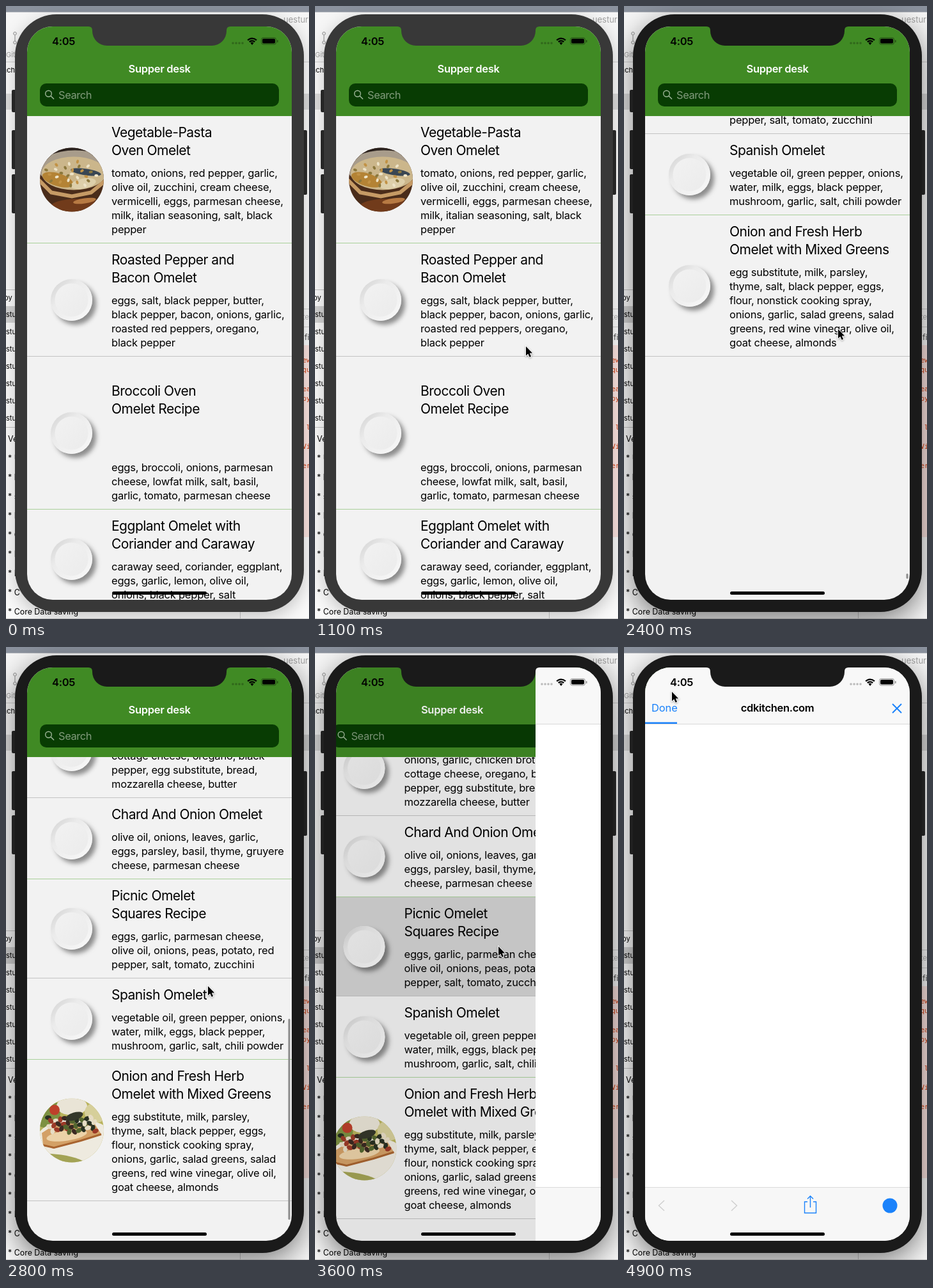
An HTML page with a canvas that plays this animation: 474 by 958 pixels, repeating every 5 s.

```html
<!DOCTYPE html>
<html lang="en">
<head>
<meta charset="utf-8">
<title>Recipe list</title>
<style>
html, body { margin: 0; width: 100%; height: 100%; overflow: hidden; background: #f4f4f4; }
canvas { display: block; width: 474px; height: 958px; }
</style>
</head>
<body>
<canvas id="stage" width="474" height="958"></canvas>
<script>
const ctx = document.getElementById('stage').getContext('2d');
const LOOP = 5000, STEP = 100;
const SANS = 'Inter, "Open Sans", sans-serif';
const MONO = '"DejaVu Sans Mono", monospace';
const BLUE = '#1a82fb';
const LEFT = 33, TOP = 32, WIDE = 414, LIST_TOP = 172, REST = 827;

const row = (title, items, photo, gap = 0) => ({
  title: title.split('|'), items: items.split('|'), photo, gap
});
const rows = [
  row('Vegetable-Pasta|Oven Omelet', 'tomato, onions, red pepper, garlic,|olive oil, zucchini, cream cheese,|vermicelli, eggs, parmesan cheese,|milk, italian seasoning, salt, black|pepper', 'skillet'),
  row('Roasted Pepper and|Bacon Omelet', 'eggs, salt, black pepper, butter,|black pepper, bacon, onions, garlic,|roasted red peppers, oregano,|black pepper'),
  row('Broccoli Oven|Omelet Recipe', 'eggs, broccoli, onions, parmesan|cheese, lowfat milk, salt, basil,|garlic, tomato, parmesan cheese', null, 28),
  row('Eggplant Omelet with|Coriander and Caraway', 'caraway seed, coriander, eggplant,|eggs, garlic, lemon, olive oil,|onions, black pepper, salt'),
  row('Italian Omelet', 'onions, garlic, chicken broth,|cottage cheese, oregano, black|pepper, egg substitute, bread,|mozzarella cheese, butter'),
  row('Chard And Onion Omelet', 'olive oil, onions, leaves, garlic,|eggs, parsley, basil, thyme, gruyere|cheese, parmesan cheese'),
  row('Picnic Omelet|Squares Recipe', 'eggs, garlic, parmesan cheese,|olive oil, onions, peas, potato, red|pepper, salt, tomato, zucchini'),
  row('Spanish Omelet', 'vegetable oil, green pepper, onions,|water, milk, eggs, black pepper,|mushroom, garlic, salt, chili powder'),
  row('Onion and Fresh Herb|Omelet with Mixed Greens', 'egg substitute, milk, parsley,|thyme, salt, black pepper, eggs,|flour, nonstick cooking spray,|onions, garlic, salad greens, salad|greens, red wine vinegar, olive oil,|goat cheese, almonds', 'pizza')
];
let total = 0;
for (const r of rows) {
  r.top = total;
  r.height = 33 + 28 * r.title.length + 22 * r.items.length + 3 * r.gap;
  total += r.height;
}

// Keys: time, then values, joined by straight segments.
const pointerKeys = [
  [800, 470, 470], [1100, 330, 532], [1200, 334, 567], [1300, 337, 660], [1400, 339, 714],
  [1600, 339, 714], [1700, 338, 690], [1800, 337, 600], [1900, 336, 520], [2400, 335, 505],
  [2800, 316, 530], [3200, 287, 468], [3900, 287, 468], [4500, 408, 102], [4700, 71, 102],
  [4800, 71, 102], [4900, 75, 70]
];
const scrollKeys = [
  [1600, 0], [1700, 24], [1800, 114], [1900, 200], [2100, 400], [2200, 600], [2300, 950], [2400, 1173]
];

function along(keys, t) {
  if (t <= keys[0][0]) return keys[0].slice(1);
  for (let i = 1; i < keys.length; i++) {
    const a = keys[i - 1], b = keys[i];
    if (t <= b[0]) {
      const u = (t - a[0]) / (b[0] - a[0]);
      return a.slice(1).map((v, j) => v + (b[j + 1] - v) * u);
    }
  }
  return keys[keys.length - 1].slice(1);
}

// Remaining share of a critically damped spring.
const settle = (t, k) => (1 + k * t) * Math.exp(-k * t);

function scrollAt(t) {
  const s = t <= 2400 ? along(scrollKeys, t)[0] : REST + 346 * settle((t - 2400) / 1000, 10.4);
  return Math.round(s);
}

function box(x, y, w, h, color) {
  ctx.fillStyle = color;
  ctx.fillRect(x, y, w, h);
}

function round(x, y, w, h, r, color) {
  ctx.beginPath();
  ctx.roundRect(x, y, w, h, r);
  ctx.fillStyle = color;
  ctx.fill();
}

function oval(x, y, rx, ry, color, turn = 0) {
  ctx.beginPath();
  ctx.ellipse(x, y, rx, ry, turn, 0, 7);
  ctx.fillStyle = color;
  ctx.fill();
}

function line(points, color, width) {
  ctx.beginPath();
  points.forEach(([x, y]) => ctx.lineTo(x, y));
  ctx.strokeStyle = color;
  ctx.lineWidth = width;
  ctx.stroke();
}

function text(str, x, y, size, color = '#000', track = 0, weight = 400, family = SANS, align = 'left') {
  ctx.font = `${weight} ${size}px ${family}`;
  ctx.letterSpacing = track + 'px';
  ctx.textAlign = align;
  ctx.fillStyle = color;
  ctx.fillText(str, x, y);
}

function shadow(color, blur, dx, dy) {
  ctx.shadowColor = color;
  ctx.shadowBlur = blur;
  ctx.shadowOffsetX = dx;
  ctx.shadowOffsetY = dy;
}

function desktop() {
  box(0, 0, 474, 958, '#fafafa');
  box(0, 0, 474, 10, '#8b929e');
  box(0, 9, 474, 1, '#b5b8be');
  box(0, 10, 474, 78, '#f6f6f6');
  box(0, 87, 474, 1, '#d0d0d0');
  box(0, 137, 474, 25, '#dcdcdc');
  ctx.strokeStyle = '#8c8c8c';
  ctx.lineWidth = 1;
  for (const y of [43, 57]) {
    ctx.beginPath();
    ctx.arc(14, y, 2.3, 0, 7);
    ctx.stroke();
  }
  line([[14, 46], [14, 54]], '#8c8c8c', 1);
  text('Git', 0, 80, 11, '#a0a0a0');
  text('ach', -5, 104, 11);
  text('uestur', 434, 26, 13, '#a0a0a0');

  box(0, 443, 20, 1, '#c4c4c4');
  text('by', -3, 460, 11);
  box(0, 469, 20, 26, '#d2d2d2');
  for (let i = 0; i < 7; i++) text('stu', 0, 486 + 27 * i, 11);
  box(0, 658, 20, 1, '#c4c4c4');
  text('Ve', 3, 681, 12.4);
  'UlsICIIC'.split('').forEach((c, i) => text('* ' + c, 3, 711 + 30 * i, 12.4));
  text('* Core Data saving', 3, 951, 12.4);
  box(0, 957, 474, 1, '#c9c9c9');
  box(366, 940, 1, 18, '#c9c9c9');

  box(460, 473, 14, 1, '#cfcfcf');
  text('te', 464, 490, 11, '#b0b0b0');
  box(460, 501, 14, 1, '#cfcfcf');
  text('fi', 467, 522, 12, '#444');
  box(460, 530, 14, 300, '#fbe3df');
  [['ew', 557], ['qu', 572], ['ea', 602], ['py', 617], [' l', 662], ['Vi', 692], ['er', 722]]
    .forEach(([s, y]) => text(s, 464, y, 10, '#cf3d10', 0, 400, MONO));
}

function shell(focused) {
  const color = focused ? '#1a1a1a' : '#383838';
  for (const [x, y, h] of [[9, 131, 35], [9, 194, 61], [9, 263, 61], [461, 194, 101]])
    round(x, y, 10, h, 2, '#2a2a2a');
  ctx.save();
  if (focused) shadow('rgba(0,0,0,.5)', 45, 0, 14);
  else shadow('rgba(0,0,0,.22)', 28, 0, 8);
  round(14, 13, 452, 934, 65, color);
  ctx.restore();
  return color;
}

function notch(color) {
  ctx.beginPath();
  ctx.moveTo(129, 31);
  ctx.lineTo(129, 32);
  ctx.quadraticCurveTo(135, 32, 135, 38);
  ctx.arcTo(135, 62, 159, 62, 23);
  ctx.arcTo(345, 62, 345, 38, 23);
  ctx.lineTo(345, 38);
  ctx.quadraticCurveTo(345, 32, 351, 32);
  ctx.lineTo(351, 31);
  ctx.fillStyle = color;
  ctx.fill();
}

function statusBar() {
  text('4:05', 72, 61, 16.5, '#000', -0.3, 600);
  for (let i = 0; i < 4; i++) oval(355 + 5 * i, 58, 1.8, 1.8, 'rgba(0,0,0,.25)');
  ctx.strokeStyle = '#000';
  ctx.lineWidth = 2.3;
  for (const r of [5.7, 9.4]) {
    ctx.beginPath();
    ctx.arc(385, 60, r, -Math.PI * 0.76, -Math.PI * 0.24);
    ctx.stroke();
  }
  ctx.beginPath();
  ctx.moveTo(385, 61);
  ctx.arc(385, 60, 3.4, -Math.PI * 0.76, -Math.PI * 0.24);
  ctx.fillStyle = '#000';
  ctx.fill();
  ctx.beginPath();
  ctx.roundRect(399.5, 49.5, 23, 10.5, 3);
  ctx.strokeStyle = 'rgba(0,0,0,.4)';
  ctx.lineWidth = 1;
  ctx.stroke();
  round(401, 51, 20, 7.5, 1.8, '#000');
  round(424, 53, 1.5, 4, 1, 'rgba(0,0,0,.45)');
}

function plate(x, y) {
  ctx.save();
  shadow('rgba(0,0,0,.42)', 7, 6, 6);
  oval(x, y, 32.5, 32.5, '#ececec');
  ctx.restore();
  const rim = ctx.createLinearGradient(x - 24, y - 24, x + 24, y + 24);
  rim.addColorStop(0, '#dadada');
  rim.addColorStop(0.3, '#ebebeb');
  rim.addColorStop(1, '#f6f6f6');
  oval(x, y, 32.5, 32.5, rim);
  const bowl = ctx.createLinearGradient(x - 20, y - 20, x + 20, y + 20);
  bowl.addColorStop(0, '#f1f1f1');
  bowl.addColorStop(1, '#ececec');
  oval(x, y, 26, 26, bowl);
}

const photos = {
  skillet() {
    box(-50, -50, 100, 100, '#4a2c1a');
    oval(-12, -44, 50, 16, '#2a211d');
    oval(5, -18, 58, 28, '#a89c8b');
    oval(3, -10, 50, 26, '#cbb68b');
    oval(22, -12, 24, 5, '#394653', 0.15);
    oval(-22, 0, 25, 10, '#b48335', 0.3);
    oval(18, 6, 20, 8, '#ddcfaa', -0.2);
    for (let i = 0; i < 26; i++) {
      const a = i * 2.4, r = Math.sqrt(i / 26);
      oval(Math.cos(a) * r * 43, -9 + Math.sin(a) * r * 21, 3, 2, ['#eee4c8', '#8c783d', '#c29245'][i % 3], a);
    }
    line([[-52, 0], [-32, 20], [0, 26], [30, 20], [52, 2]], '#c59a65', 6);
    oval(8, 43, 42, 13, '#713b1b');
    oval(20, 33, 18, 4, '#b77a43', -0.15);
  },
  pizza() {
    box(-50, -50, 100, 100, '#b9b35c');
    oval(-40, -28, 22, 24, '#7d9142');
    oval(0, -38, 24, 14, '#e9e4d6');
    oval(38, -28, 18, 16, '#d6cf9a');
    oval(6, 16, 62, 34, '#eeeadf');
    oval(-18, 46, 40, 8, '#a3a355', 0.15);
    ctx.beginPath();
    [[-47, 4], [-22, -12], [36, -10], [46, 6], [14, 16], [-30, 28], [-45, 22]].forEach(p => ctx.lineTo(...p));
    ctx.fillStyle = '#d3a066';
    ctx.fill();
    oval(-8, 8, 32, 8, '#ecd2a8', -0.15);
    line([[-45, 23], [-28, 27], [14, 16], [46, 6]], '#a8642f', 3);
    for (let i = 0; i < 34; i++) {
      const x = (i * 29) % 75 - 37, y = -20 + (i * 17) % 23;
      oval(x, y, 5, 3.5, ['#293022', '#9c3a28', '#55672f', '#e6dcc4', '#3b2a22'][i % 5], i);
    }
    oval(-27, -32, 8, 8, '#bd402b');
    oval(4, -22, 14, 6, '#34372a', -0.3);
  }
};

function photo(name, x, y) {
  ctx.save();
  ctx.translate(x, y);
  ctx.beginPath();
  ctx.arc(0, 0, 50, 0, 7);
  ctx.clip();
  photos[name]();
  ctx.restore();
}

function listRow(r, i, t, y) {
  if (i === 6 && t >= 3400) box(LEFT, y, WIDE, r.height, '#d3d3d3');
  const mid = y + r.height / 2;
  if (r.photo === 'skillet' || (r.photo && t >= 2600)) photo(r.photo, 103, mid);
  else plate(102.5, mid);
  r.title.forEach((s, n) => text(s, 165, y + 33 + r.gap + 28 * n, 21, '#000', -0.5));
  const first = y + 39 + 28 * r.title.length + 3 * r.gap;
  r.items.forEach((s, n) => text(s, 165, first + 22 * n, 16.5, '#000', -0.21));
  const green = (i < 4) === (i % 2 === 0);
  box(LEFT, y + r.height - 1, WIDE, 1, green ? '#a9d09a' : '#c3c3c3');
}

function scrollBar(s) {
  const length = Math.max(8, 342 - Math.max(0, s - REST));
  const top = s < REST ? 175 + s / REST * 378 : 895 - length;
  round(441.5, top, 3, length, 1.5, '#8d8d8d');
}

function listView(t) {
  const s = scrollAt(t);
  box(LEFT, TOP, WIDE, 896, '#f2f2f2');
  rows.forEach((r, i) => {
    const y = LIST_TOP + r.top - s;
    if (y < 940 && y + r.height > LIST_TOP) listRow(r, i, t, y);
  });
  if (t >= 1600) scrollBar(s);
  box(LEFT, TOP, WIDE, LIST_TOP - TOP, '#408a24');
  text('Supper desk', 240, 104, 16.5, '#fff', -0.3, 600, SANS, 'center');
  round(53, 121, 374, 36, 10, '#083c03');
  ctx.beginPath();
  ctx.arc(66.5, 137, 4.8, 0, 7);
  ctx.strokeStyle = '#9db598';
  ctx.lineWidth = 1.4;
  ctx.stroke();
  line([[70, 140.5], [75, 145.5]], '#9db598', 1.6);
  text('Search', 82, 145, 16.5, '#819b7c', -0.45);
}

function webView(t) {
  box(LEFT, TOP, WIDE, 896, '#fff');
  box(LEFT, TOP, WIDE, 89, '#f8f8f8');
  box(LEFT, 120, WIDE, 1, '#d9d9d9');
  box(LEFT, 844, WIDE, 84, '#f7f7f7');
  box(LEFT, 844, WIDE, 1, '#dadada');
  if (t < 3900) return;
  text('Done', 43, 101, 16.5, BLUE, -0.1);
  text('cdkitchen.com', 240, 101, 16.5, '#000', -0.3, 600, SANS, 'center');
  line([[420, 89], [434, 103]], BLUE, 2);
  line([[434, 89], [420, 103]], BLUE, 2);
  if (t >= 4100) box(LEFT, 117.5, 50, 2.5, BLUE);
  line([[63, 865], [54.5, 873], [63, 881]], '#d0d0d0', 1.5);
  line([[168, 865], [176.5, 873], [168, 881]], '#d0d0d0', 1.5);
  line([[287, 867], [282.5, 867], [282.5, 884.5], [300.5, 884.5], [300.5, 867], [296, 867]], BLUE, 1.4);
  line([[291.5, 876], [291.5, 858]], BLUE, 1.4);
  line([[287, 862.5], [291.5, 858], [296, 862.5]], BLUE, 1.4);
  oval(416, 873, 11.5, 11.5, BLUE);
}

function screen(t) {
  const p = t > 3520 ? 1 - settle((t - 3520) / 1000, 11.9) : 0;
  ctx.save();
  ctx.beginPath();
  ctx.roundRect(LEFT, TOP, WIDE, 896, 40);
  ctx.clip();
  ctx.save();
  ctx.translate(-WIDE * p / 4, 0);
  listView(t);
  ctx.restore();
  if (p) {
    box(LEFT, TOP, WIDE, 896, `rgba(0,0,0,${Math.min(0.1, 0.27 * p)})`);
    ctx.translate(Math.round(WIDE * (1 - p)), 0);
    webView(t);
  }
  ctx.restore();
  statusBar();
  round(166, 915, 148, 5, 2.5, '#000');
}

function pointer(t) {
  if (t < 800) return;
  const [x, y] = along(pointerKeys, t);
  ctx.save();
  ctx.translate(x, y);
  ctx.beginPath();
  [[0, 0], [0, 14.5], [3.3, 11.5], [5.7, 16.8], [8, 15.8], [5.8, 10.6], [10.2, 10.6]].forEach(q => ctx.lineTo(...q));
  ctx.closePath();
  shadow('rgba(0,0,0,.35)', 3, 0, 1);
  ctx.strokeStyle = '#fff';
  ctx.lineWidth = 1.8;
  ctx.stroke();
  shadow('transparent', 0, 0, 0);
  ctx.fillStyle = '#000';
  ctx.fill();
  ctx.restore();
}

function draw(t) {
  desktop();
  const color = shell(t >= 1600);
  screen(t);
  notch(color);
  pointer(t);
}

const start = performance.now();
function tick() {
  const t = Math.max(0, performance.now() - start) % LOOP;
  draw(Math.floor(t / STEP) * STEP);
  requestAnimationFrame(tick);
}
tick();
</script>
</body>
</html>
```
